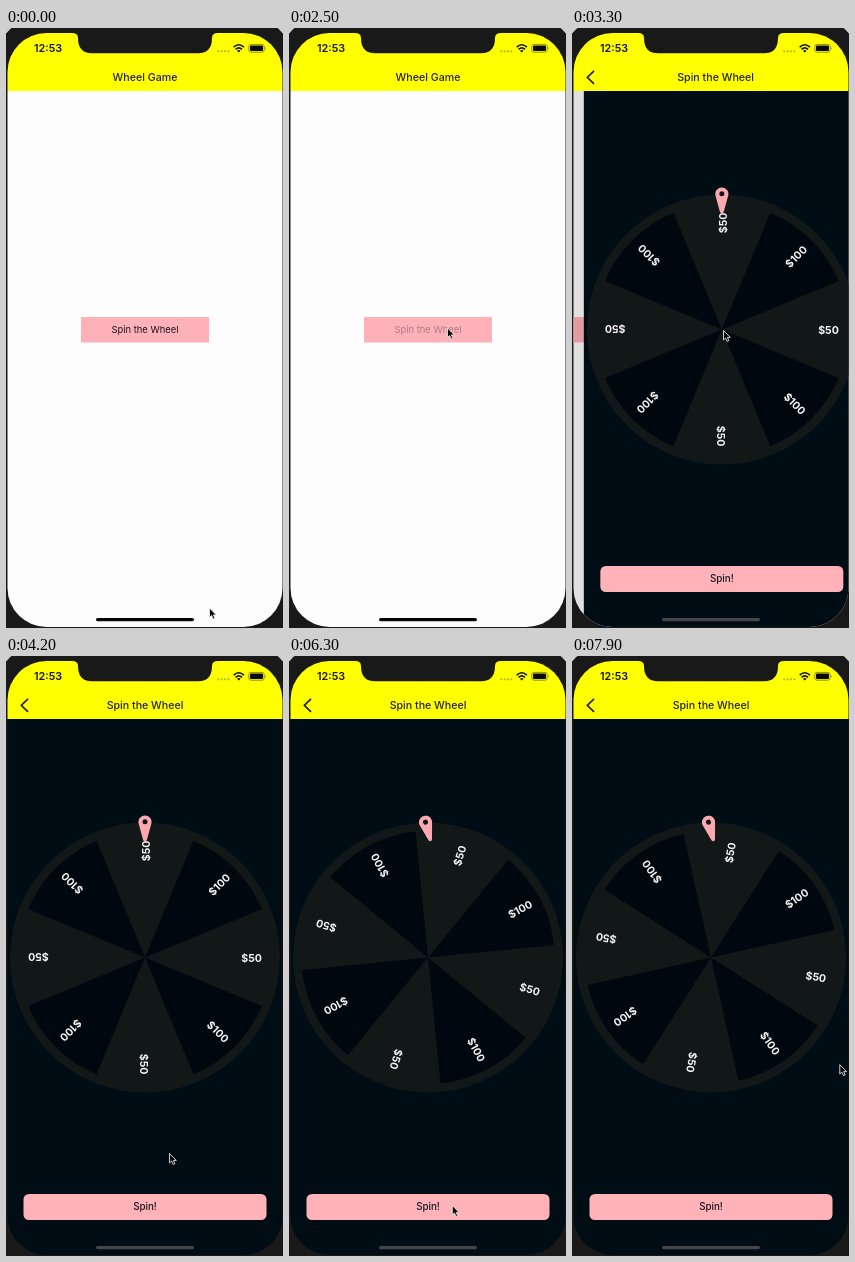
Animation of 277 by 600 pixels, one loop 8 s. Source, as an HTML page:

```html
<!DOCTYPE html>
<html lang="en">
<head>
<meta charset="utf-8">
<title>Wheel</title>
<style>
  html, body { margin: 0; width: 100%; height: 100%; overflow: hidden; background: #cfcfcf; }
  svg { display: block; width: 277px; height: 600px; }
  text { font-family: Inter, Roboto, sans-serif; text-anchor: middle; fill: #161622; }
  .title { font-size: 10.65px; font-weight: 500; fill: #25223c; }
  .prize { font-size: 10.6px; font-weight: 700; fill: #f4f4f4; text-anchor: end; }
</style>
</head>
<body>
<svg viewBox="0 0 277 600">
  <defs>
    <clipPath id="screen"><rect x="1.5" y="5" width="275" height="594" rx="39"/></clipPath>
  </defs>
  <rect x="-12" y="-12" width="301" height="640" rx="50" fill="#19191a"/>

  <g clip-path="url(#screen)">
    <g id="home">
      <rect x="0" y="63" width="370" height="537" fill="#fdfdfd"/>
      <rect x="75" y="289" width="128" height="25.5" fill="#ffb1b9"/>
      <text id="homeLabel" x="139" y="305.2" font-size="9.4">Spin the Wheel</text>
    </g>
    <rect id="shade" y="63" width="277" height="537" fill="#000"/>

    <g id="game">
      <rect x="1" y="63" width="278" height="537" fill="#000d14"/>
      <g id="wheel">
        <circle r="135" fill="#121718"/>
      </g>
      <g id="pin">
        <path d="M139 185.5 C137.6 185.5 137.1 184 136.7 182.5 L132.9 168.5 A6.6 6.6 0 1 1 145.1 168.5 L141.3 182.5 C140.9 184 140.4 185.5 139 185.5Z" fill="#fba9b1"/>
        <circle cx="139" cy="165.8" r="2.5" fill="#11171a"/>
      </g>
      <rect x="17.5" y="538" width="243" height="26" rx="5.5" fill="#ffb3b9"/>
      <text x="139" y="554.4" font-size="9.8" font-weight="500">Spin!</text>
    </g>

    <rect width="277" height="63" fill="#ff0"/>
    <text id="homeTitle" class="title" y="53">Wheel Game</text>
    <text id="gameTitle" class="title" y="53">Spin the Wheel</text>
    <path id="back" d="M21.5 43.3 L15.3 49.3 L21.5 55.3" fill="none" stroke="#222230" stroke-width="1.7" stroke-linecap="round" stroke-linejoin="round"/>

    <text x="42" y="24.3" font-size="10.8" font-weight="600">12:53</text>
    <g fill="#b4b41c">
      <circle cx="212.2" cy="23.3" r="1.1"/><circle cx="215.6" cy="23.3" r="1.1"/>
      <circle cx="219" cy="23.3" r="1.1"/><circle cx="222.4" cy="23.3" r="1.1"/>
    </g>
    <g fill="none" stroke="#111" stroke-width="1.6">
      <path d="M227.7 19.1 Q232.8 14.4 237.9 19.1"/>
      <path d="M229.6 21.3 Q232.8 18.4 236 21.3"/>
    </g>
    <path d="M231 22.8 Q232.8 21.3 234.6 22.8 L232.8 24.6Z" fill="#111"/>
    <rect x="242.8" y="16.4" width="15.4" height="7.8" rx="2.2" fill="none" stroke="#77771c" stroke-width=".8"/>
    <rect x="244" y="17.6" width="13" height="5.4" rx="1.1" fill="#0a0a0a"/>
    <path d="M259.1 18.8 Q260.5 20.3 259.1 21.8Z" fill="#77771c"/>
    <rect id="bar" x="90" y="590" width="98" height="3.2" rx="1.6"/>
  </g>

  <path d="M66 0 V5 Q72 5 72 10 Q72 25.3 86 25.3 H192 Q206 25.3 206 10 Q206 5 212 5 V0Z" fill="#19191a"/>
  <path id="cursor" d="M0 0 V9.4 L2.1 7.5 L3.7 11 L5.4 10.2 L3.9 6.9 H6.8Z" fill="#0a0a0a" stroke="#e4e4e4" stroke-width=".9" stroke-linejoin="round"/>
</svg>
<script>
const LOOP = 8000, PUSH_AT = 3025, SPIN_AT = 5220;
const $ = id => document.getElementById(id);
const set = (id, attrs) => {
  for (const name in attrs) $(id).setAttribute(name, attrs[name]);
};
const clamp = v => Math.min(1, Math.max(0, v));
const smooth = v => v * v * (3 - 2 * v);

// time, x, y
const cursorPath = [
  [0, 203.5, 580], [900, 203.5, 580], [2200, 158.5, 300], [2700, 158.5, 300],
  [3200, 151.5, 302.5], [3500, 151.5, 302.5], [4200, 163.5, 497.5], [4700, 163.3, 549.5],
  [6500, 163.3, 549.5], [6900, 162, 550.5], [7800, 267.8, 408.7], [8000, 267.8, 408.7]
];

function buildWheel() {
  const at = (deg, r) => {
    const a = deg * Math.PI / 180;
    return `${(r * Math.cos(a)).toFixed(2)} ${(r * Math.sin(a)).toFixed(2)}`;
  };
  let parts = '';
  for (let i = 0; i < 8; i++) {
    const deg = i * 45, odd = i % 2;
    if (odd) parts += `<path d="M0 0L${at(deg - 22.5, 126.5)}A126.5 126.5 0 0 1 ${at(deg + 22.5, 126.5)}Z" fill="#00080f"/>`;
    parts += `<text class="prize" x="117" y="4.8" transform="rotate(${deg})">${odd ? '$100' : '$50'}</text>`;
  }
  $('wheel').innerHTML += parts;
}

function cursorAt(t) {
  const i = cursorPath.findIndex(p => p[0] > t);
  const [t0, x0, y0] = cursorPath[i - 1], [t1, x1, y1] = cursorPath[i];
  const k = smooth((t - t0) / (t1 - t0));
  return [x0 + (x1 - x0) * k, y0 + (y1 - y0) * k];
}

// Critically damped spring from 0 to 1
function pushAt(t) {
  const s = Math.max(0, t - PUSH_AT) / 1000 * 18.26;
  return 1 - (1 + s) * Math.exp(-s);
}

function wheelAngle(t) {
  const s = Math.max(0, t - SPIN_AT) / 1000;
  return s * s * (101.5 - 9.32 * s);
}

function render(t) {
  const p = pushAt(t), rest = 1 - p;
  const press = clamp((t - 2350) / 150) - clamp((t - 2700) / 250);
  set('home', { transform: `translate(${-83 * p} 0)`, opacity: p > 0.998 ? 0 : 1 });
  set('homeLabel', { opacity: 1 - 0.65 * press });
  set('shade', { opacity: 0.12 * p });
  set('game', { transform: `translate(${277 * rest} 0)` });
  set('wheel', { transform: `translate(139 301.5) rotate(${wheelAngle(t)})` });
  set('pin', { transform: `rotate(${t > SPIN_AT ? -15 : 0} 138.9 175.5)` });
  set('homeTitle', { x: 139 - 100 * p, opacity: clamp(1 - 1.6 * p) });
  set('gameTitle', { x: 139 + 118 * rest, opacity: clamp(p * 1.5 - 0.4) });
  set('back', { opacity: clamp(p * 1.5 - 0.4) });
  set('bar', { fill: p > 0.5 ? '#444648' : '#050505' });
  set('cursor', { transform: `translate(${cursorAt(t)})` });
}

buildWheel();
const start = performance.now();
function tick(now) {
  render(Math.max(0, now - start) % LOOP);
  requestAnimationFrame(tick);
}
render(0);
requestAnimationFrame(tick);
</script>
</body>
</html>
```
